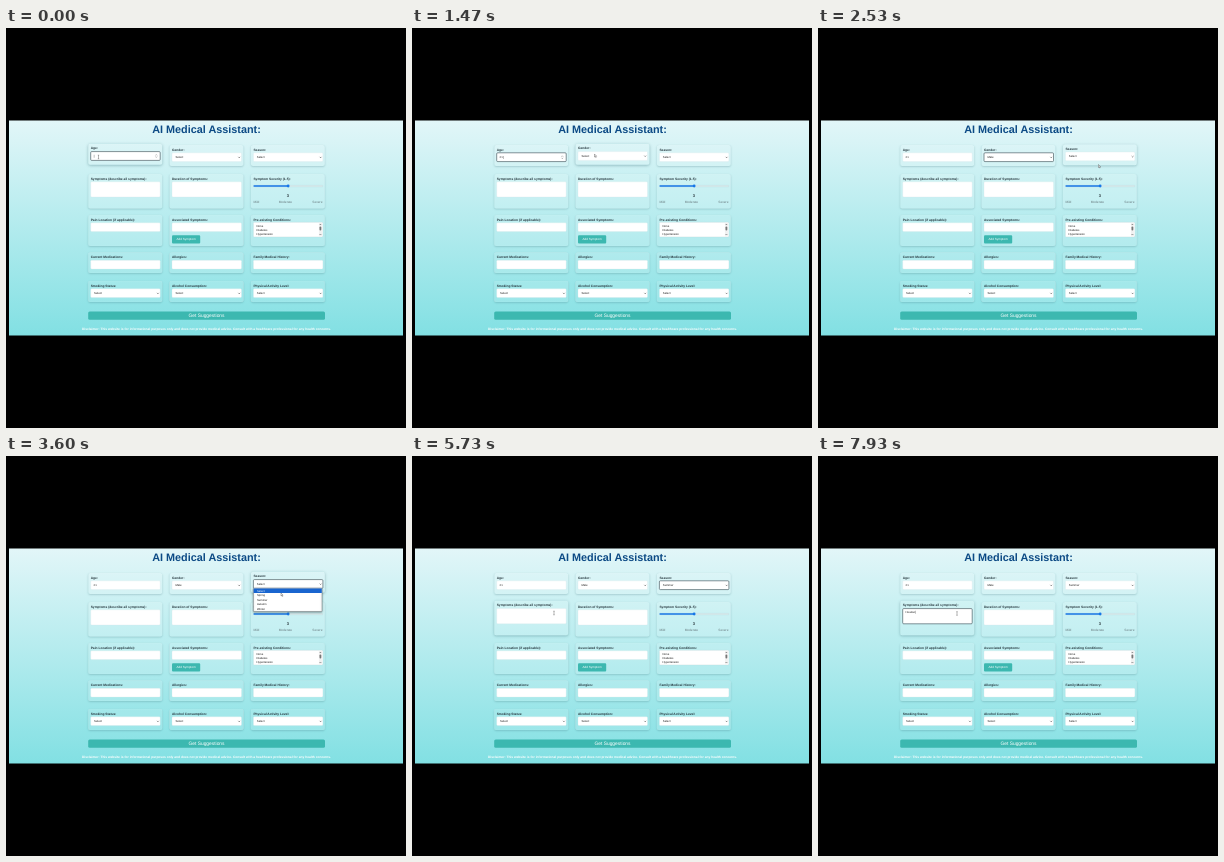
Animation of 400x400 px, one loop 8 s. Source, as an HTML page with a canvas:

```html
<!DOCTYPE html>
<html lang="en">
<head>
<meta charset="utf-8">
<title>AI Medical Assistant</title>
<style>
html, body { margin: 0; width: 100%; height: 100%; overflow: hidden; background: #000; }
canvas { display: block; width: 100vw; height: 100vh; }
</style>
</head>
<body>
<canvas></canvas>
<script>
const LOOP = 8000;
const canvas = document.querySelector('canvas');
const ctx = canvas.getContext('2d');
const TEAL = '#3cb8b0', INK = '#263238', FIELD_WIDTH = 69.5;
const columns = [84.7, 166, 247.4];
const rows = [
  { top: 117, bottom: 138 },
  { top: 146, bottom: 180.5 },
  { top: 187, bottom: 218 },
  { top: 224.5, bottom: 245 },
  { top: 253, bottom: 274 }
];
const cards = [
  ['Age:', 'input'], ['Gender:', 'select'], ['Season:', 'select'],
  ['Symptoms (describe all symptoms):', 'area'], ['Duration of Symptoms:', 'area'], ['Symptom Severity (1-5):', 'slider'],
  ['Pain Location (if applicable):', 'input'], ['Associated Symptoms:', 'adder'], ['Pre-existing Conditions:', 'list'],
  ['Current Medications:', 'input'], ['Allergies:', 'input'], ['Family Medical History:', 'input'],
  ['Smoking Status:', 'select'], ['Alcohol Consumption:', 'select'], ['Physical Activity Level:', 'select']
].map(([label, kind], i) => ({ label, kind, x: columns[i % 3], ...rows[Math.floor(i / 3)] }));
const [age, gender, season, symptoms] = cards;

// Start and end of each state, in ms
age.hover = [-999, 1050];      age.focus = [0, 1750];
gender.hover = [1150, 2300];   gender.focus = [1750, 2900];
season.hover = [2400, 5150];   season.focus = [2900, 5950];
symptoms.hover = [5400, 9999]; symptoms.focus = [5950, 9999];
gender.menu = { open: [1750, 2120], items: ['Select', 'Male', 'Female', 'Other'], choice: 1 };
season.menu = { open: [2900, 4950], items: ['Select', 'Spring', 'Summer', 'Autumn', 'Winter'], choice: 2 };
age.typing = { text: '21', start: 450, step: 300 };
symptoms.typing = { text: 'Headac', start: 6450, step: 250 };

// time, x, y of the pointer
const path = [
  [0, 92.5, 129], [850, 92.5, 129], [1300, 182.5, 125.5], [1750, 182.5, 127], [2000, 183, 138.5],
  [2120, 183, 138.5], [2480, 280.5, 136.5], [2580, 280.5, 136.5], [2850, 278, 129], [2950, 278, 129],
  [3400, 275, 137], [3750, 275, 137], [4300, 269.5, 143.8], [5000, 269.5, 143.8],
  [5550, 142, 157], [6000, 142, 157], [6400, 139, 157.5], [LOOP, 139, 157.5]
];

const during = (t, span) => !!span && t >= span[0] && t < span[1];
const ease = p => { p = Math.min(1, Math.max(0, p)); return p * p * (3 - 2 * p); };

function pointerAt(t) {
  const i = Math.max(1, path.findIndex(p => p[0] > t));
  const [t0, x0, y0] = path[i - 1], [t1, x1, y1] = path[i];
  const p = ease((t - t0) / (t1 - t0));
  return [x0 + (x1 - x0) * p, y0 + (y1 - y0) * p];
}

function text(str, x, y, size, color = INK, weight = 400, align = 'left') {
  ctx.font = `${weight} ${size}px "Liberation Sans", Arial, sans-serif`;
  ctx.fillStyle = color;
  ctx.textAlign = align;
  ctx.fillText(str, x, y);
}

function box(x, y, w, h, r, fill, stroke, line = 0.5) {
  ctx.beginPath();
  ctx.roundRect(x, y, w, h, r);
  if (fill) { ctx.fillStyle = fill; ctx.fill(); }
  if (stroke) { ctx.strokeStyle = stroke; ctx.lineWidth = line; ctx.stroke(); }
}

function shadow(color, blur = 0, dy = 0) {
  const k = canvas.width / 400;
  ctx.shadowColor = color;
  ctx.shadowBlur = blur * k;
  ctx.shadowOffsetY = dy * k;
}

function chevron(x, y, size, dir = 1, color = INK) {
  ctx.beginPath();
  ctx.moveTo(x - size, y - size * dir / 2);
  ctx.lineTo(x, y + size * dir / 2);
  ctx.lineTo(x + size, y - size * dir / 2);
  ctx.strokeStyle = color;
  ctx.lineWidth = 0.5;
  ctx.stroke();
}

function field(x, y, h, focused) {
  box(x, y, FIELD_WIDTH, h, 1, '#fff', focused ? '#34474f' : '#d3e3e6', focused ? 0.6 : 0.3);
}

function drawSlider(x, y) {
  const right = x + FIELD_WIDTH - 0.5, mid = x + FIELD_WIDTH / 2;
  box(x, y + 11.3, FIELD_WIDTH, 1.5, 0.75, '#dcebed', '#a9c6ca', 0.2);
  box(x, y + 11.3, FIELD_WIDTH / 2, 1.5, 0.75, '#1677e8');
  box(mid - 1.4, y + 10.6, 2.8, 2.8, 1.4, '#1677e8');
  text('3', mid - 0.2, y + 22.7, 4, INK, 700, 'center');
  text('Mild', x, y + 28.7, 3.2, '#66777c');
  text('Moderate', x + 32, y + 28.7, 3.2, '#66777c', 400, 'center');
  text('Severe', right, y + 28.7, 3.2, '#66777c', 400, 'right');
}

function drawList(x, y) {
  box(x, y + 7.3, FIELD_WIDTH, 14.6, 1, '#fff', '#b9ced2', 0.3);
  ['None', 'Diabetes', 'Hypertension'].forEach((s, i) => text(s, x + 3.2, y + 12.4 + i * 3.55, 2.75, '#111'));
  const bar = x + 67;
  box(bar - 1.5, y + 7.7, 3, 13.8, 0, '#f1f1f1');
  box(bar - 0.9, y + 11.5, 1.8, 4, 0.9, '#777');
  chevron(bar, y + 9.6, 0.8, -1, '#333');
  chevron(bar, y + 19.6, 0.8, 1, '#333');
}

function drawCard(card, t) {
  const { x, top: y, kind, hover, typing, menu } = card;
  const focused = during(t, card.focus);
  const lift = hover ? ease((t - hover[0]) / 220) - ease((t - hover[1]) / 220) : 0;
  ctx.save();
  ctx.translate(0, -1.2 * lift);
  shadow(`rgba(0,60,70,${0.24 + 0.1 * lift})`, 2 + lift, 0.7);
  const height = card.bottom - y;
  ctx.save();
  ctx.beginPath();
  ctx.rect(x - 9, y - 6, 90, height + 14);
  ctx.roundRect(x - 2.5, y, 74, height, 2);
  ctx.clip('evenodd');
  box(x - 2.5, y, 74, height, 2, '#b5e3e6');
  ctx.restore();
  shadow('transparent');
  box(x - 2.5, y, 74, height, 2, 'rgba(255,255,255,.1)', 'rgba(255,255,255,.22)', 0.3);
  text(card.label, x, y + 5.6, 3.25, '#24343b', 700);

  if (kind === 'slider') drawSlider(x, y);
  else if (kind === 'list') drawList(x, y);
  else field(x, y + 7.8, kind === 'area' ? 15.2 : 8.8, focused);

  if (kind === 'select') {
    const chosen = menu && t >= menu.open[1] ? menu.items[menu.choice] : 'Select';
    text(chosen, x + 3.4, y + 13.2, 2.8, '#111');
    chevron(x + 67.2, y + 12.3, 0.9, 1, '#222');
  }
  if (kind === 'adder') {
    box(x, y + 20.3, 28.2, 8.2, 1.1, TEAL);
    text('Add Symptom', x + 14.1, y + 25.4, 3.05, '#fff', 400, 'center');
  }
  if (typing) {
    const count = Math.max(0, Math.floor((t - typing.start) / typing.step) + 1);
    const typed = typing.text.slice(0, count), base = y + (kind === 'area' ? 12.3 : 13.4);
    text(typed, x + 2.9, base, 2.8, '#222');
    if (focused) box(x + 3.2 + ctx.measureText(typed).width, base - 2.4, 0.3, 3, 0, '#333');
  }
  if (card === age && (focused || lift > 0.5)) {
    chevron(x + 65.6, y + 11.2, 0.7, -1, '#555');
    chevron(x + 65.6, y + 13.2, 0.7, 1, '#555');
  }
  ctx.restore();
}

function drawMenu({ x, menu }, t, pointerY) {
  if (!during(t, menu.open)) return;
  const top = 132.2, row = 4.55, count = menu.items.length;
  const active = Math.min(count - 1, Math.max(0, Math.floor((pointerY - top - 0.3) / row)));
  shadow('rgba(0,0,0,.4)', 2, 0.7);
  box(x, top, 68.6, count * row + 0.6, 0.6, '#fff', '#59666b', 0.4);
  shadow('transparent');
  menu.items.forEach((item, i) => {
    const y = top + 0.3 + i * row;
    if (i === active) box(x + 0.2, y, 68.2, row, 0, '#1965cf');
    text(item, x + 3.6, y + 3.3, 2.75, i === active ? '#fff' : '#111');
  });
}

function drawPointer(t, x, y) {
  ctx.beginPath();
  if (t < 900 || t > 5450) {
    ctx.moveTo(x - 0.7, y - 1.8); ctx.lineTo(x + 0.7, y - 1.8);
    ctx.moveTo(x, y - 1.8); ctx.lineTo(x, y + 1.8);
    ctx.moveTo(x - 0.7, y + 1.8); ctx.lineTo(x + 0.7, y + 1.8);
    ctx.strokeStyle = '#444';
    ctx.lineWidth = 0.4;
    ctx.stroke();
    return;
  }
  ctx.moveTo(x, y);
  for (const [dx, dy] of [[0, 3], [0.7, 2.4], [1.2, 3.5], [1.7, 3.3], [1.2, 2.2], [2.1, 2.2]]) ctx.lineTo(x + dx, y + dy);
  ctx.closePath();
  ctx.fillStyle = '#fff';
  ctx.fill();
  ctx.strokeStyle = '#333';
  ctx.lineWidth = 0.35;
  ctx.stroke();
}

function drawPage() {
  ctx.fillStyle = '#000';
  ctx.fillRect(0, 0, 400, 400);
  const sky = ctx.createLinearGradient(0, 92.5, 0, 307.5);
  sky.addColorStop(0, '#e2f6f8');
  sky.addColorStop(1, '#82e0e3');
  ctx.fillStyle = sky;
  ctx.fillRect(3, 92.5, 394, 215);
  text('AI Medical Assistant:', 200.5, 104.7, 10.83, '#0c4a85', 700, 'center');
  box(82.2, 283.6, 236.8, 8.2, 1.5, TEAL);
  text('Get Suggestions', 200.5, 289.4, 4.88, '#fff', 400, 'center');
  text('Disclaimer: This website is for informational purposes only and does not provide medical advice. ' +
    'Consult with a healthcare professional for any health concerns.', 200.5, 302, 3.25, '#fff', 700, 'center');
}

function render(t) {
  const size = Math.round(innerWidth * devicePixelRatio);
  if (canvas.width !== size) canvas.width = canvas.height = size;
  ctx.setTransform(size / 400, 0, 0, size / 400, 0, 0);
  ctx.textRendering = 'geometricPrecision';
  const [x, y] = pointerAt(t);
  drawPage();
  cards.forEach(card => drawCard(card, t));
  drawMenu(gender, t, y);
  drawMenu(season, t, y);
  drawPointer(t, x, y);
}

const start = performance.now();
function tick() {
  render((performance.now() - start) % LOOP);
  requestAnimationFrame(tick);
}
tick();
</script>
</body>
</html>
```
